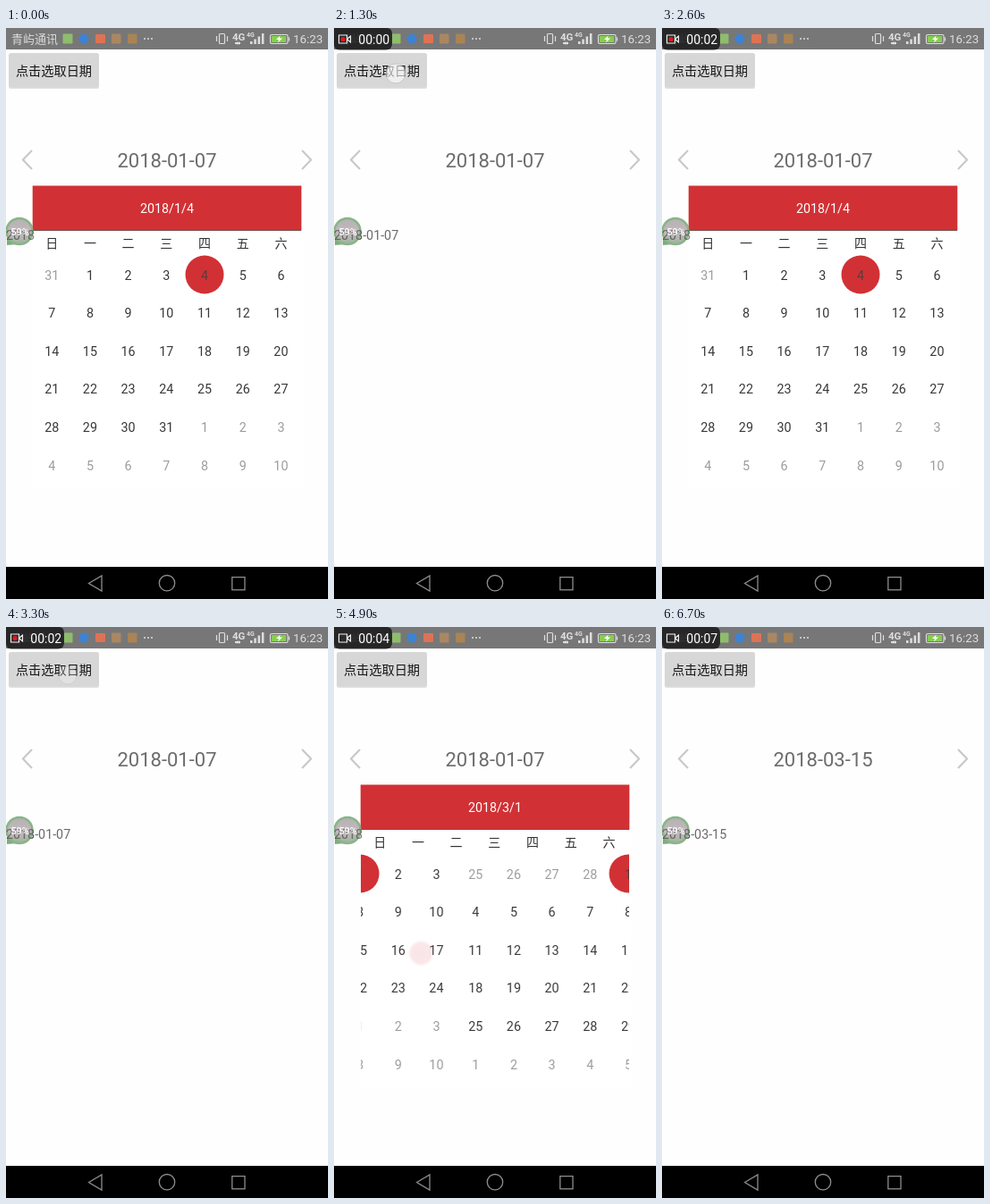
These frames come from a looping animation (360x639 px, 6800 ms). An HTML page:

```html
<!DOCTYPE html>
<html lang="zh-CN">
<head>
<meta charset="utf-8">
<title>日期选择</title>
<style>
html, body { margin: 0; width: 100%; height: 100%; overflow: hidden; background: #fdfefd; }
svg { display: block; width: 360px; height: 639px; font: 14.3px Roboto, "Noto Sans CJK SC", "Noto Sans CJK", sans-serif; }
.mid { text-anchor: middle; }
.line { fill: none; stroke: #8d8d8d; stroke-width: 1.3; }
.arrow { fill: none; stroke: #c9c9c9; stroke-width: 2.2; }
.bar { fill: #dedede; }
.day { fill: #383838; }
.other { fill: #9c9c9c; }
.pick { fill: #53403c; }
.anim { animation: 6.8s linear infinite; }
#card { animation-name: card; }
#strip { animation-name: strip; }
#pill { animation-name: pill; }
#dot { animation: blink 1s step-end infinite; }
#tapOpen { animation-name: tapOpen; }
#tapAgain { animation-name: tapAgain; }
#drag1 { animation-name: drag1; }
#drag2 { animation-name: drag2; }
#tapDay { animation-name: tapDay; }
#tapHead { animation-name: tapHead; }
@keyframes card {
  0%, 4.4% { opacity: 1; }
  7.4%, 22.8% { opacity: 0; }
  29.4% { opacity: .87; }
  30.9%, 39.7% { opacity: 1; }
  42.7%, 50% { opacity: 0; }
  54.4%, 95.9% { opacity: 1; }
  98.2%, 100% { opacity: 0; }
}
@keyframes strip {
  0%, 58.1% { transform: translateX(0); }
  61% { transform: translateX(-150px); }
  63.24% { transform: translateX(-253px); }
  64.7% { transform: translateX(-290px); }
  66.2%, 69.1% { transform: translateX(-300px); }
  71.5% { transform: translateX(-460px); }
  73.5% { transform: translateX(-575px); }
  75%, 100% { transform: translateX(-600px); }
}
@keyframes pill {
  0%, 1.4% { opacity: 0; }
  4.4%, 100% { opacity: 1; }
}
@keyframes blink { 0% { opacity: 1; } 65% { opacity: 0; } }
@keyframes tapOpen {
  0%, 17.2% { opacity: 0; }
  18%, 20% { opacity: .6; }
  22%, 100% { opacity: 0; }
}
@keyframes tapAgain {
  0%, 45% { opacity: 0; }
  46%, 47.6% { opacity: .6; }
  49.3%, 100% { opacity: 0; }
}
@keyframes drag1 {
  0%, 57% { opacity: 0; transform: translate(265px, 365px); }
  58.1% { opacity: .75; transform: translate(265px, 365px); }
  61% { opacity: .75; transform: translate(115px, 365px); }
  62.5%, 100% { opacity: 0; transform: translate(90px, 365px); }
}
@keyframes drag2 {
  0%, 68% { opacity: 0; transform: translate(265px, 365px); }
  69.1% { opacity: .75; transform: translate(265px, 365px); }
  71.5% { opacity: .75; transform: translate(105px, 365px); }
  73%, 100% { opacity: 0; transform: translate(85px, 365px); }
}
@keyframes tapDay {
  0%, 75.8% { opacity: 0; }
  76.5%, 77.5% { opacity: .8; }
  79%, 100% { opacity: 0; }
}
@keyframes tapHead {
  0%, 80.9% { opacity: 0; }
  81.6%, 83.2% { opacity: 1; }
  85%, 100% { opacity: 0; }
}
</style>
</head>
<body>
<svg viewBox="0 0 360 639">
  <defs>
    <clipPath id="window"><rect x="30" y="227" width="300" height="288"/></clipPath>
    <linearGradient id="ballFill" x2="0" y2="1">
      <stop offset="0" stop-color="#a9a3a6"/>
      <stop offset=".55" stop-color="#b9aeb3"/>
      <stop offset="1" stop-color="#8fa58e"/>
    </linearGradient>
    <radialGradient id="touch">
      <stop offset="0" stop-color="#efc6ca"/>
      <stop offset=".58" stop-color="#f1ccd0"/>
      <stop offset=".72" stop-color="#f0b9bd" stop-opacity=".75"/>
      <stop offset=".82" stop-color="#ee9a9e" stop-opacity=".35"/>
      <stop offset="1" stop-color="#ee9a9e" stop-opacity="0"/>
    </radialGradient>
  </defs>

  <rect width="360" height="639" fill="#fdfefd"/>

  <!-- page -->
  <rect x="3" y="29.5" width="101" height="38.5" rx="2.5" fill="#000" opacity=".12"/>
  <rect x="3" y="28" width="101" height="38.5" rx="2.5" fill="#d6d7d6"/>
  <text class="mid" x="53.500" y="53" font-size="14.200" font-weight="500" fill="#161616">点击选取日期</text>
  <path class="arrow" d="M29 137 19 147.500 29 158M331 137 341 147.500 331 158"/>
  <text id="title" class="mid" x="180" y="155.500" font-size="22" fill="#6c6c6c"></text>
  <text id="note" x="0" y="237" fill="#6a6a6a"></text>

  <!-- calendar -->
  <g id="card" class="anim">
    <rect x="28" y="177" width="304" height="339" rx="1" fill="#fff"/>
    <rect x="29.700" y="176.500" width="300.600" height="50" fill="#d13135"/>
    <rect x="30" y="226" width="300" height="1" fill="#77504b"/>
    <text id="head" class="mid" x="180" y="207" fill="#fff"></text>
    <g id="week"></g>
    <g clip-path="url(#window)"><g id="strip" class="anim"></g></g>
  </g>

  <!-- floating ball -->
  <g opacity=".85">
    <path d="M1 243V231L13 242Z" fill="#6c9c6a"/>
    <circle cx="15" cy="227.500" r="14.500" fill="url(#ballFill)" stroke="#75a873" stroke-width="2.500"/>
  </g>
  <text x="0" y="237" fill="#555" opacity=".75">2018</text>
  <text class="mid" x="15.500" y="231.500" font-size="11" font-weight="500" fill="#fff">59%</text>

  <!-- status bar -->
  <rect width="360" height="24" fill="#777"/>
  <text x="6" y="17" font-size="13" fill="#dcdcdc">青屿通讯</text>
  <rect x="63.500" y="6.500" width="11" height="11" rx="1" fill="#8fbd6c"/>
  <circle cx="87" cy="12" r="5.500" fill="#3d83d2"/>
  <rect x="100" y="7" width="11" height="10" rx="1" fill="#dd7354"/>
  <rect x="118" y="6.500" width="10.500" height="11" rx="1" fill="#a98762"/>
  <rect x="136" y="6.500" width="10.500" height="11" rx="1" fill="#a98455"/>
  <g class="bar">
    <circle cx="155" cy="12" r="1"/><circle cx="159" cy="12" r="1"/><circle cx="163" cy="12" r="1"/>
    <text x="253" y="13.500" font-size="11.500" font-weight="700">4G</text>
    <text x="269" y="9.500" font-size="7" font-weight="700">4G</text>
    <path d="M256 16h2v-1l2 2-2 2v-1h-2zM262 16h-1v-1l-2 2 2 2v-1h1z"/>
    <path d="M273 15h2.500v3H273zM277.300 12.500h2.500V18h-2.500zM281.600 9.500h2.500V18h-2.500zM285.900 6h2.500v12h-2.500z"/>
    <text x="321" y="17" font-size="13.300">16:23</text>
  </g>
  <g fill="none" stroke="#dedede" stroke-width="1.200">
    <rect x="238.500" y="6.500" width="6" height="11" rx="1"/>
    <path d="M235.500 9v6M247.500 9v6"/>
    <rect x="295.500" y="7.500" width="19.500" height="10" rx="1.500"/>
    <path d="M316.500 10.500v4"/>
  </g>
  <rect x="297" y="9" width="16" height="7" fill="#86cf4c"/>
  <path d="M306.500 8.500 302 13h3l-1 3.500 5-5h-3z" fill="#fff"/>

  <!-- recorder -->
  <g id="pill" class="anim">
    <path d="M0 0H59Q65 0 65 7V17Q65 24.500 58 24.500H6Q0 24.500 0 18Z" fill="#1c1c1c" opacity=".88"/>
    <path d="M5.500 8H14.500V17H5.500ZM14.500 12.500 18.500 9V16Z" fill="none" stroke="#eee" stroke-width="1.200"/>
    <circle id="dot" cx="10" cy="12.500" r="2.600" fill="#e3191d"/>
    <text id="clock" x="27.300" y="17.500" font-size="14" fill="#fff"></text>
  </g>

  <!-- touches -->
  <g fill="#fff" stroke="#bdb8b8" stroke-width="1">
    <circle id="tapOpen" class="anim" cx="69" cy="51" r="11" opacity="0"/>
    <circle id="tapAgain" class="anim" cx="69" cy="54" r="10" opacity="0"/>
  </g>
  <g fill="url(#touch)">
    <circle id="drag1" class="anim" r="15"/>
    <circle id="drag2" class="anim" r="15"/>
    <circle id="tapDay" class="anim" cx="222" cy="361" r="15"/>
    <circle id="tapHead" class="anim" cx="287" cy="201" r="15"/>
  </g>

  <!-- navigation bar -->
  <rect y="603" width="360" height="36" fill="#000"/>
  <path class="line" d="M92.500 621.500 107 613V630Z"/>
  <circle class="line" cx="180" cy="621.200" r="8.700"/>
  <rect class="line" x="252.800" y="614.600" width="14.200" height="14.200"/>
</svg>
<script>
const LOOP = 6800;
const $ = id => document.getElementById(id);
const colX = i => 51.2 + i * 42.7;
const rowY = i => 276 + i * 42.6;

function add(parent, tag, attrs, text = '') {
  const el = document.createElementNS('http://www.w3.org/2000/svg', tag);
  for (const key in attrs) el.setAttribute(key, attrs[key]);
  el.textContent = text;
  return parent.appendChild(el);
}

[...'日一二三四五六'].forEach((name, i) =>
  add($('week'), 'text', { class: 'mid', x: colX(i), y: 246, 'font-size': 14, 'font-weight': 500, fill: '#333' }, name));

// One month page; returns a function that selects a day of that month.
function makePage(month) {
  const page = add($('strip'), 'g', { transform: `translate(${month * 300})` });
  const disc = add(page, 'circle', { r: 21.5, fill: '#d13135' });
  const first = new Date(2018, month, 1).getDay();
  const cells = [];
  for (let i = 0; i < 42; i++) {
    const date = new Date(2018, month, 1 - first + i);
    const kind = date.getMonth() === month ? 'day' : 'other';
    cells.push(add(page, 'text', {
      class: 'mid ' + kind, x: colX(i % 7), y: rowY(Math.floor(i / 7)) + 5.5
    }, date.getDate()));
  }
  let last = -1;
  return day => {
    if (day === last) return;
    last = day;
    const at = first + day - 1;
    disc.setAttribute('cx', colX(at % 7));
    disc.setAttribute('cy', rowY(Math.floor(at / 7)));
    cells.forEach((c, i) => c.classList.toggle('pick', i === at));
  };
}
const pages = [0, 1, 2].map(makePage);
pages[0](4);
pages[1](1);

function setText(id, text) {
  const el = $(id);
  if (el.textContent !== text) el.textContent = text;
}

const ticks = [1400, 2400, 3400, 4400, 5300, 6000, 6600];

function draw(t) {
  const seconds = ticks.filter(at => t >= at).length;
  const date = t < 6600 ? '2018-01-07' : '2018-03-15';
  setText('clock', '00:0' + seconds);
  setText('title', date);
  setText('note', date);
  setText('head', '2018/' + (t < 4150 ? '1/4' : t < 4820 ? '2/1' : t < 5250 ? '3/1' : '3/15'));
  pages[2](t < 5250 ? 1 : 15);
}

let start;
function frame(now) {
  start ??= now;
  draw((now - start) % LOOP);
  requestAnimationFrame(frame);
}
draw(0);
requestAnimationFrame(frame);
</script>
</body>
</html>
```
